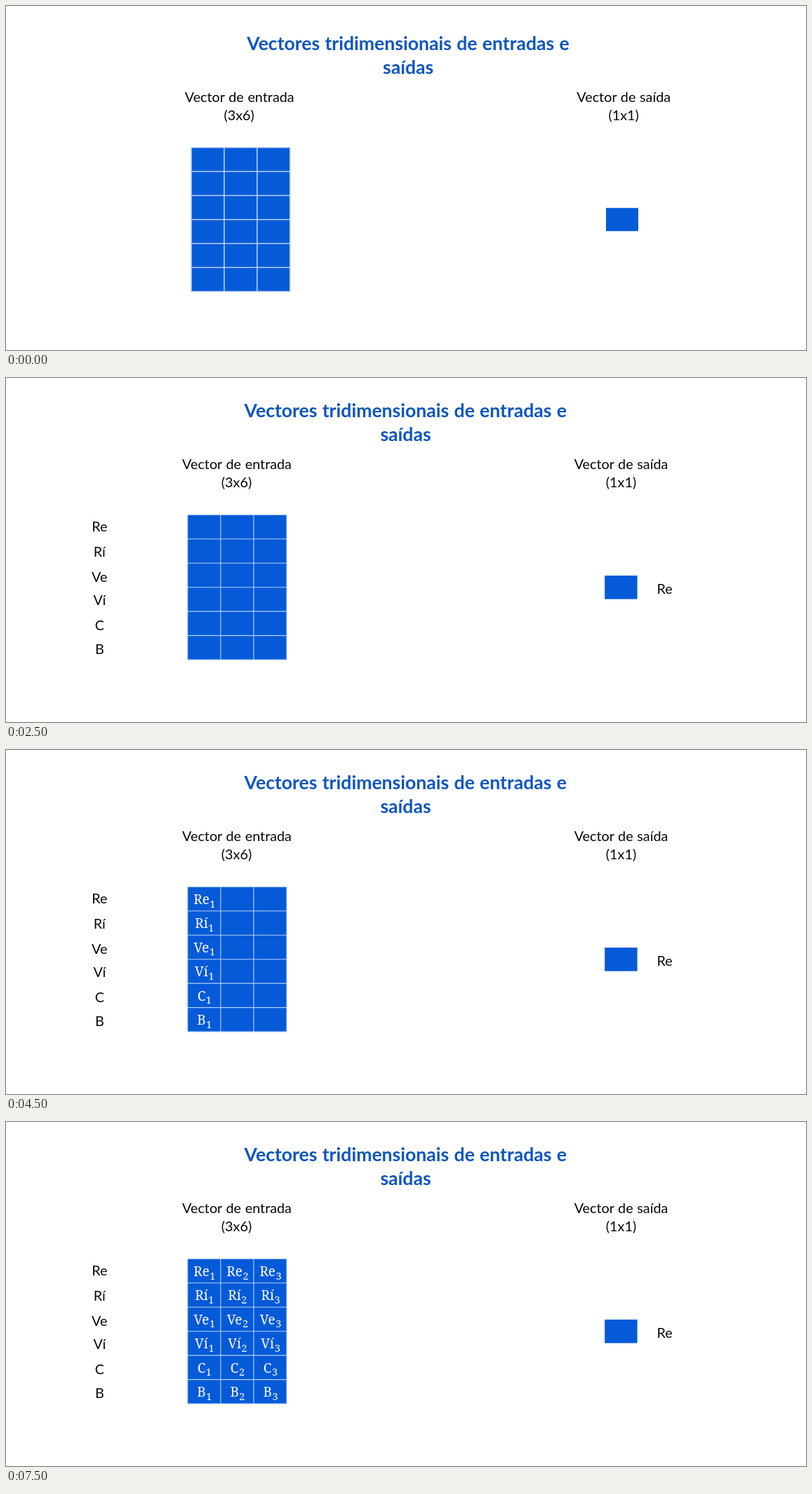
Write an HTML page that moves like this. It is 1140x491 px and loops after 8000 ms.

```html
<!DOCTYPE html>
<html lang="gl">
<head>
<meta charset="utf-8">
<title>Vectores de entradas e saídas</title>
<style>
  html, body { margin: 0; width: 100%; height: 100%; overflow: hidden; background: #fff; }
  svg { display: block; width: 1140px; height: 491px; }
  text { font: 19.8px Lato, Carlito, sans-serif; fill: #080808; word-spacing: .03em; }
  .mid { text-anchor: middle; }
  .title { font-size: 26.6px; font-weight: 700; fill: #0e55bd; }
  .small { font-size: 15.8px; }
  .tight { word-spacing: -.08em; }
  .cell { font: 19px "Noto Serif", serif; fill: #fff; word-spacing: 0; }
  .sub { font-size: 14.5px; }
  .block { fill: #055ad8; }
  .rules { fill: none; stroke: #b4d0f5; }
</style>
</head>
<body>
<svg id="stage" viewBox="0 0 1140 491"></svg>
<script>
const LOOP = 8000;
const CUTS = [500, 2500, 4500, 6500, 7500];
const ROWS = [
  { short: 'Re', long: 'Rendibilidade da empresa', y: 215 },
  { short: 'Rí', long: 'Rendemento do índice', y: 251 },
  { short: 'Ve', long: 'Volatilidade da empresa', y: 287 },
  { short: 'Ví', long: 'Volatilidade do índice', y: 320 },
  { short: 'C', long: 'Correlación empresa-índice', y: 356, cls: 'tight' },
  { short: 'B', long: 'Beta empresa-índice', y: 390, x: 38 }
];

const text = (x, y, s, cls = '') => `<text x="${x}" y="${y}" class="${cls}">${s}</text>`;
const rect = (x, y, w, h) => `<rect class="block" x="${x}" y="${y}" width="${w}" height="${h}"/>`;

function grid(x, y, w, h, lineWidth) {
  let d = '';
  for (let i = 0; i <= 3; i++) d += `M${x + i * w / 3} ${y}v${h}`;
  for (let i = 0; i <= 6; i++) d += `M${x} ${y + i * h / 6}h${w}`;
  return rect(x, y, w, h) + `<path class="rules" stroke-width="${lineWidth}" d="${d}"/>`;
}

function headings(dx, dy) {
  return `<g transform="translate(${dx} ${dy})">` +
    text(569.3, 55.5, 'Vectores tridimensionais de entradas e', 'mid title') +
    text(569.5, 89.5, 'saídas', 'mid title') +
    text(329, 130, 'Vector de entrada', 'mid') +
    text(328.5, 156, '(3x6)', 'mid') +
    text(876.5, 130, 'Vector de saída', 'mid') +
    text(876.5, 156, '(1x1)', 'mid') + '</g>';
}

const longLabels = () =>
  ROWS.map(r => text(r.x || 35, r.y, r.long, 'small ' + (r.cls || ''))).join('') +
  text(927, 304, ROWS[0].long, 'small');

const shortLabels = () =>
  ROWS.map(r => text(133.3, r.y + 4, r.short, 'mid')).join('') +
  text(927.5, 308, 'Re');

function column(n) {
  return ROWS.map((r, i) => text(282.8 + 47.1 * (n - 1), 220 + 34.45 * i,
    `${r.short}<tspan class="sub" dx=".5" dy="4.5">${n}</tspan>`, 'mid cell')).join('');
}

function scene(step) {
  if (step === 0) {
    return headings(3.7, 7.3) + grid(264, 202, 140.8, 205.5, 1.6) + rect(855, 288.3, 46, 33);
  }
  let out = headings(0, 0) + grid(258.8, 195.3, 141.2, 206.8, 1.1) + rect(853.2, 282, 46.4, 33.6);
  out += step === 1 ? longLabels() : shortLabels();
  for (let n = 1; n <= step - 2; n++) out += column(n);
  return out;
}

const stage = document.getElementById('stage');
let shown = -1;

function draw() {
  const t = performance.now() % LOOP;
  const step = CUTS.filter(cut => t >= cut).length;
  if (step !== shown) stage.innerHTML = scene(shown = step);
  requestAnimationFrame(draw);
}
draw();
</script>
</body>
</html>
```
